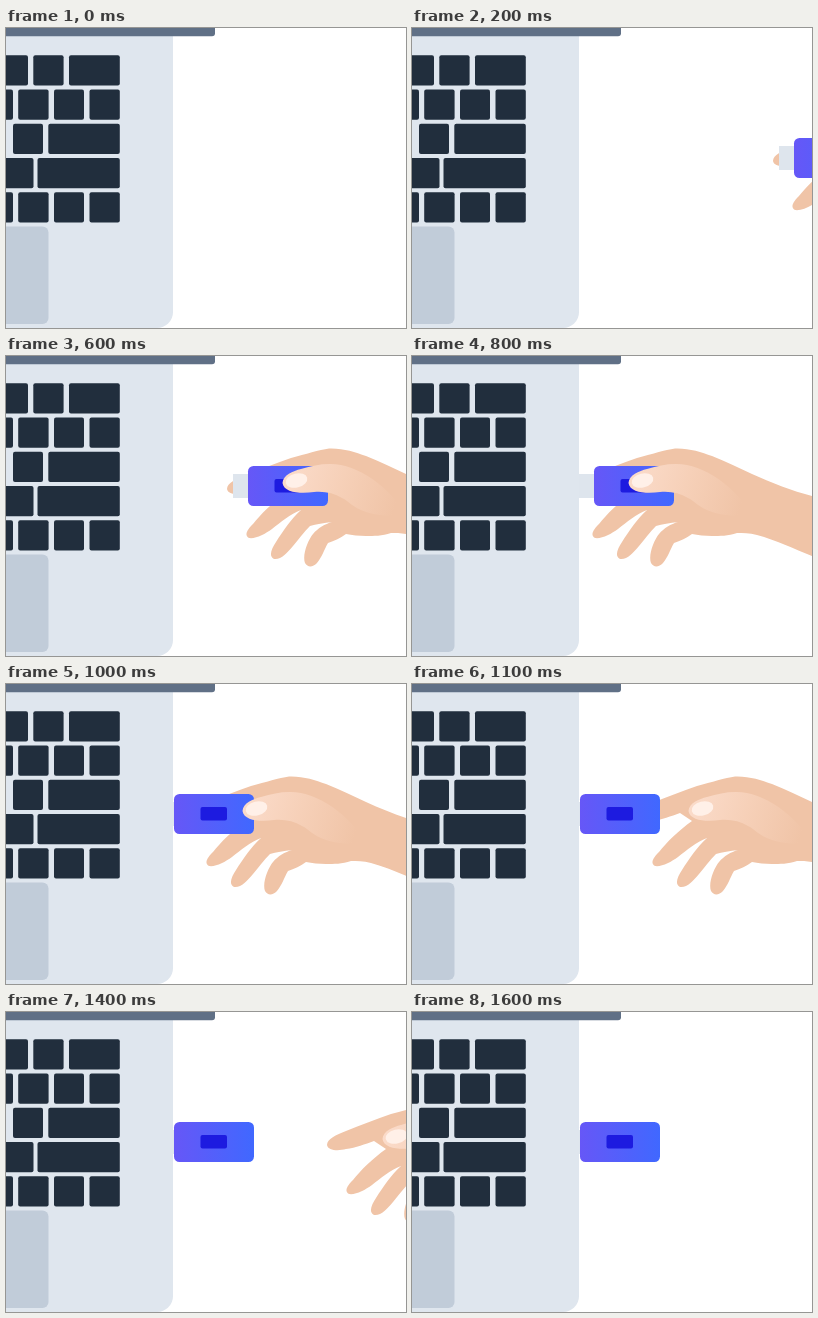
Recreate the animation shown at these times as an HTML page. Size 400x300 px, loop 1700 ms.

```html
<!DOCTYPE html>
<html lang="en">
<head>
<meta charset="utf-8">
<title>Plugging in a USB stick</title>
<style>
  html, body { margin: 0; width: 100%; height: 100%; overflow: hidden; background: #fff; }
  svg { display: block; width: 100vw; height: 100vh; }
</style>
</head>
<body>
<svg viewBox="0 0 400 300">
  <defs>
    <linearGradient id="blue">
      <stop stop-color="#6657f7"/>
      <stop offset="1" stop-color="#4068ff"/>
    </linearGradient>
    <linearGradient id="glow" gradientUnits="userSpaceOnUse" x1="276" y1="118" x2="388" y2="154">
      <stop stop-color="#fbdccb"/>
      <stop offset=".5" stop-color="#f6d0b8"/>
      <stop offset="1" stop-color="#f0c4a7"/>
    </linearGradient>
  </defs>

  <g class="hand" fill="#f0c4a7">
    <path d="M221 133 C221 127 230 123 240 119 C255 113 270 107 285 102
      C300 98 313 94 323 92.500 C337 92 349 96 360 100 C375 106 387 112 400 118
      C420 127 440 135 460 140 L500 151 V217 L460 200 C442 193 424 184 405 179
      C397 177 391 177 385 177 C376 180 368 180 360 180 C353 180 346 179 340 178
      C335 182 328 185 322 187 C318 194 316 201 311 207 C307 211 302 212 299 207
      C296 199 302 184 307 178 C312 172 319 168 326 166 C318 167 310 168 304 170
      C298 176 292 184 287 190 C281 197 275 204 268 203 C262 200 266 192 270 186
      C277 175 285 163 295 154 C284 158 275 166 266 173 C259 178 250 183 243 182
      C237 179 243 172 247 168 C254 159 267 146 280 137 L268 129
      C259 132 250 136 240 137 C233 139 222 139 221 133 Z"/>
  </g>

  <g id="stick">
    <rect x="227" y="118" width="18" height="24" fill="#dee5ed"/>
    <rect x="242" y="110" width="80" height="40" rx="5.500" fill="url(#blue)"/>
    <rect x="268.500" y="123" width="26.500" height="13.500" rx="2" fill="#1d1be0"/>
  </g>

  <g class="hand">
    <path fill="url(#glow)" d="M276.500 127 C277 119 287 115 295 113 C305 110 314 108 323 108
      C350 107 384 130 400 160 C386 160 371 160 360 156 C347 152 343 145 336 142
      C328 137 318 135 308 136 C295 138 278 137 276.500 127 Z"/>
    <ellipse cx="290.500" cy="124.500" rx="11" ry="7" transform="rotate(-14 290.500 124.500)" fill="#fff0e8"/>
  </g>

  <path d="M0 0H167V284A16 16 0 0 1 151 300H0Z" fill="#dfe6ee"/>
  <rect x="-10" y="-10" width="219" height="18.300" rx="3" fill="#607086"/>
  <rect x="-20" y="198.500" width="62.500" height="97.500" rx="6" fill="#c1ccd9"/>
  <g id="keys" fill="#212e3d"></g>
</svg>
<script>
  const STEP = 100;
  // Horizontal shift of the hand for each step of the loop
  const shifts = [180, 160, 140, 120, 80, 40, 0, -40, -60, -74, -40, 0, 20, 60, 100, 140, 180];
  const PLUGGED = -74, PLUG_STEP = 9;

  // Left and right edge of every key, row by row
  const spaced = [[-24, 7], [12.2, 42.6], [48, 78], [83.500, 113.800]];
  const rows = [
    [[-9, 22], [27.300, 57.600], [63, 113.800]],
    spaced,
    [[7, 37], [42.300, 113.800]],
    [[-40, 27.500], [31.500, 113.800]],
    spaced
  ];
  document.getElementById('keys').innerHTML = rows.map((row, i) => row.map(([a, b]) =>
    `<rect x="${a}" y="${27.3 + i * 34.25}" width="${b - a}" height="30.2" rx="2"/>`
  ).join('')).join('');

  const hands = document.querySelectorAll('.hand');
  const stick = document.getElementById('stick');
  const moveTo = (part, x) => part.setAttribute('transform', `translate(${x} 0)`);

  function draw(now) {
    const step = Math.floor(now / STEP) % shifts.length;
    hands.forEach(part => moveTo(part, shifts[step]));
    moveTo(stick, step < PLUG_STEP ? shifts[step] : PLUGGED);
    requestAnimationFrame(draw);
  }
  draw(performance.now());
</script>
</body>
</html>
```
